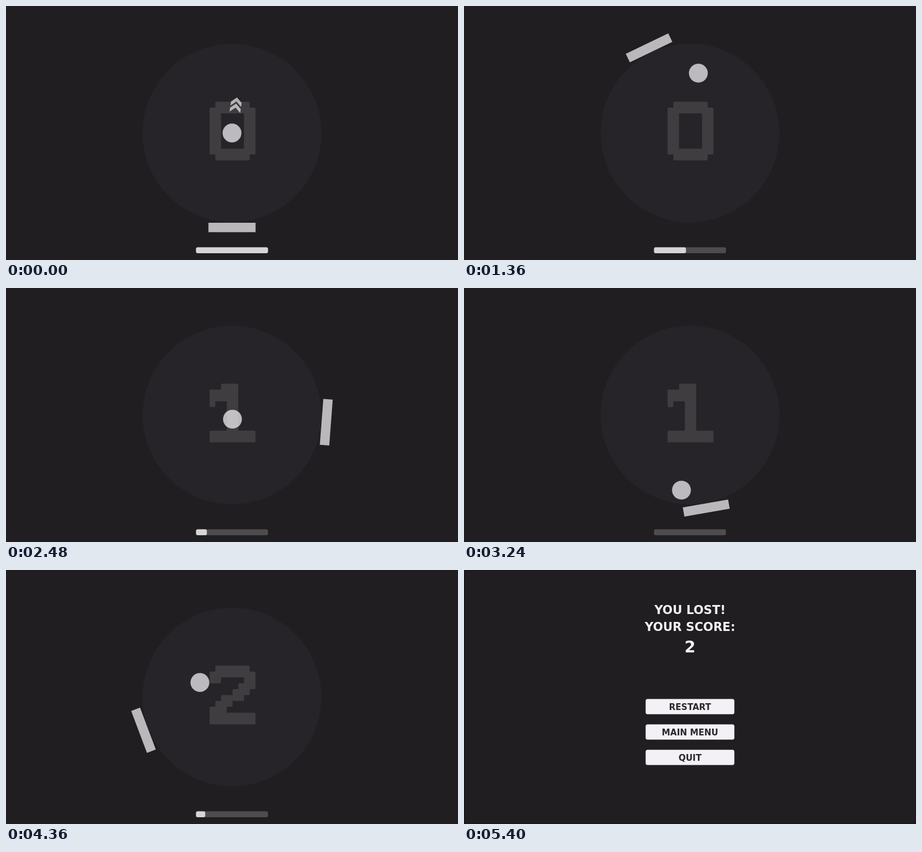
These frames come from a looping animation (800 px wide and 450 px high, 7080 ms). An HTML page with a canvas:

```html
<!DOCTYPE html>
<html lang="en">
<head>
<meta charset="utf-8">
<title>Circle paddle game</title>
<style>
  html, body { margin: 0; width: 100%; height: 100%; overflow: hidden; background: #201e21; }
  canvas { display: block; width: 800px; height: 450px; }
</style>
</head>
<body>
<canvas id="stage" width="800" height="450"></canvas>
<script>
const ctx = document.getElementById('stage').getContext('2d');

const LOOP = 7080, STEP = 40, GAME_OVER = 5400;
const CX = 400, CY = 225, ARENA = 158.3;
const LIGHT = '#f3f1f5', GLASS = 'rgba(243,241,245,0.735)', BACK = '#201e21';

// Speeds are per millisecond.
const START = 270, TURN = 0.0708;
const SPRINTS = [[START, 1895], [2440, 2790]];
const STAMINA = 127.4, DRAIN = 0.065, REGAIN = 0.0454, REST_END = 4000;
const LAUNCH = 718, BALL_SPEED = 0.1668;
const course = [[400, 225], [419.8, 83], [383.4, 369.7], [303, 29]];

// Strokes of a square pen on an 8 by 10 grid: pen size, then its stops.
const digits = [
  [[2, [1, 0], [5, 0], [6, 1], [6, 7], [5, 8], [1, 8], [0, 7], [0, 1]]],
  [[2, [0, 1], [2, 1], [2, 0], [3, 0], [3, 8], [0, 8], [6, 8]], [1, [0, 2], [0, 3]]],
  [[2, [0, 1], [1, 0], [5, 0], [6, 1], [6, 2], [5, 3], [4, 4], [2, 5], [1, 6], [0, 7],
    [0, 8], [6, 8]]]
];

const since = (t, start) => Math.max(0, t - start);

const sprintTime = t =>
  SPRINTS.reduce((sum, [from, to]) => sum + since(Math.min(t, to), from), 0);

const paddleAngle = t => 90 + TURN * (since(t, START) + sprintTime(t));

const stamina = t =>
  Math.max(0, STAMINA - DRAIN * sprintTime(t)) + REGAIN * since(t, REST_END);

// The ball runs along its course at constant speed; each corner is a hit.
function ballAt(t) {
  let left = BALL_SPEED * since(t, LAUNCH);
  for (let hits = 0; ; hits++) {
    const [x, y] = course[hits], [nx, ny] = course[hits + 1];
    const length = Math.hypot(nx - x, ny - y);
    if (left <= length || hits + 2 === course.length) {
      const k = left / length;
      return { x: x + (nx - x) * k, y: y + (ny - y) * k, hits };
    }
    left -= length;
  }
}

function box(x, y, w, h, r, color) {
  ctx.fillStyle = color;
  ctx.beginPath();
  ctx.roundRect(x, y, w, h, r);
  ctx.fill();
}

function disc(x, y, r, color) {
  ctx.fillStyle = color;
  ctx.beginPath();
  ctx.arc(x, y, r, 0, Math.PI * 2);
  ctx.fill();
}

function turned(degrees, draw) {
  ctx.save();
  ctx.translate(CX, CY);
  ctx.rotate(degrees * Math.PI / 180);
  draw();
  ctx.restore();
}

function drawScore(n) {
  const cw = 10.16, ch = 10.4;
  ctx.fillStyle = '#3f3d40';
  ctx.beginPath();
  for (const [pen, ...stops] of digits[n]) {
    stops.forEach(([x, y], i) => {
      let [nx, ny] = stops[i + 1] || [x, y];
      if (nx !== x && ny !== y) [nx, ny] = [x, y];
      ctx.roundRect(360.3 + Math.min(x, nx) * cw, 169.5 + Math.min(y, ny) * ch,
        (Math.abs(nx - x) + pen) * cw, (Math.abs(ny - y) + pen) * ch, 2);
    });
  }
  ctx.fill();
}

function drawArrow() {
  ctx.fillStyle = 'rgba(243,241,245,0.68)';
  for (const top of [-63.5, -52.5]) {
    ctx.beginPath();
    ctx.moveTo(0, top);
    ctx.lineTo(9.5, top + 8.5);
    ctx.lineTo(9.5, top + 15.5);
    ctx.lineTo(0, top + 7);
    ctx.lineTo(-9.5, top + 15.5);
    ctx.lineTo(-9.5, top + 8.5);
    ctx.fill();
  }
}

function drawPaddle(length) {
  ctx.fillStyle = GLASS;
  ctx.fillRect(159, -length / 2, 16.7, length);
}

function drawStamina(width) {
  box(336.3, 427.4, STAMINA, 10.6, 3, '#4d4c4e');
  if (width > 0) box(336.3, 427.4, width, 10.6, Math.min(3, width / 2), '#d6d6d6');
}

function drawGame(t) {
  const ball = ballAt(t);
  disc(CX, CY, ARENA, '#262428');
  drawScore(ball.hits);
  if (t < LAUNCH) turned(8, drawArrow);
  // Every point scored makes the paddle a little shorter.
  turned(paddleAngle(t), () => drawPaddle(83.4 - 2 * ball.hits));
  disc(ball.x, ball.y, 16.7, GLASS);
  drawStamina(stamina(t));
}

function label(text, y, size, color) {
  ctx.font = `bold ${size}px "DejaVu Sans", sans-serif`;
  ctx.textAlign = 'center';
  ctx.fillStyle = color;
  ctx.fillText(text, CX, y);
}

function drawMenu() {
  ctx.strokeStyle = '#19171a';
  ctx.lineWidth = 2;
  ctx.beginPath();
  ctx.roundRect(0.5, 0.5, 799, 449, 4);
  ctx.stroke();
  label('YOU LOST!', 77.5, 21, LIGHT);
  label('YOUR SCORE:', 108, 21, LIGHT);
  label('2', 146, 28, LIGHT);
  ['RESTART', 'MAIN MENU', 'QUIT'].forEach((text, i) => {
    const y = 228.5 + i * 45;
    box(321.5, y, 157, 27, 3.5, LIGHT);
    label(text, y + 19, 15, '#2a282b');
  });
}

function frame(now) {
  const t = Math.floor((now % LOOP) / STEP) * STEP;
  ctx.fillStyle = BACK;
  ctx.fillRect(0, 0, 800, 450);
  if (t < GAME_OVER) drawGame(t);
  else drawMenu();
  requestAnimationFrame(frame);
}
requestAnimationFrame(frame);
</script>
</body>
</html>
```
